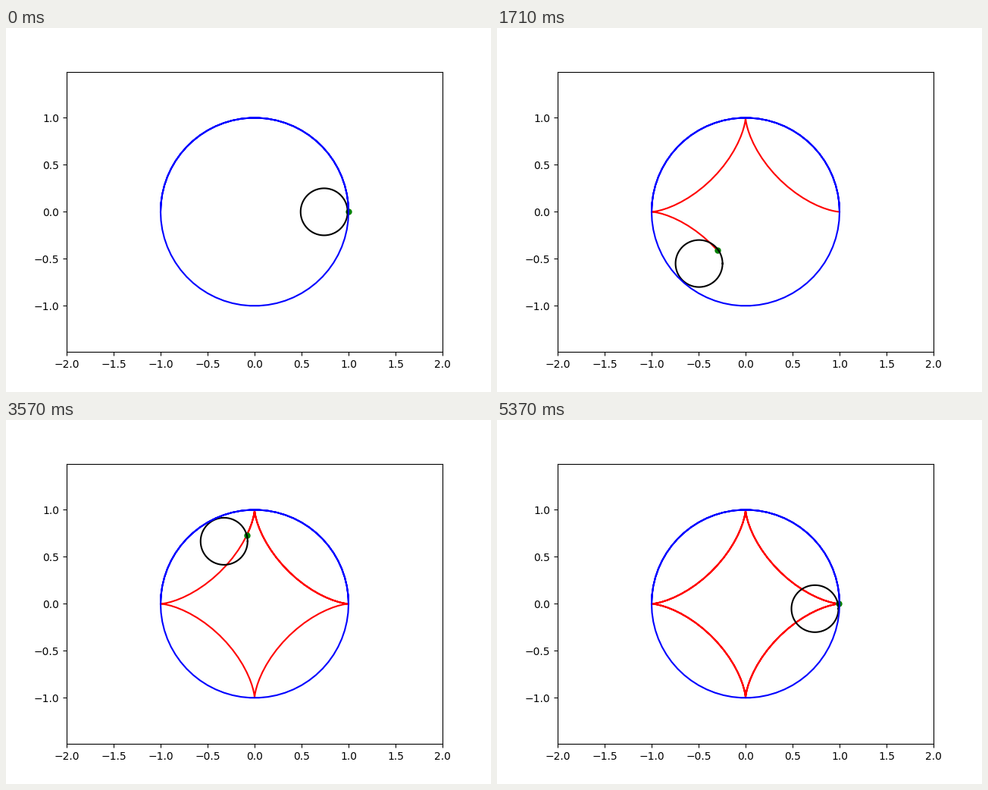
Write a matplotlib script that moves like this. It is 640 by 480 pixels and loops after 5400 ms.

```python
import numpy as np
import matplotlib.pyplot as plt
from matplotlib.animation import FuncAnimation

FRAMES = 180
STEP = np.radians(4)
R, r = 1.0, 0.25
GAP = 0.01  # keeps the rolling circle just inside the big one

fig, ax = plt.subplots(figsize=(6.4, 4.8), dpi=100)
ax.set_aspect("equal", adjustable="datalim")
ax.set_xlim(-2, 2)
ax.set_ylim(-1.5, 1.5)

# Path of a point on the rolling circle, two full turns
angle = np.arange(FRAMES) * STEP
path_x = (R - r) * np.cos(angle) + r * np.cos((R - r) / r * angle)
path_y = (R - r) * np.sin(angle) - r * np.sin((R - r) / r * angle)

turn = np.linspace(0, 2 * np.pi, 100)
ring_x, ring_y = r * np.cos(turn), r * np.sin(turn)

trace, = ax.plot([], [], "r")
dot, = ax.plot([], [], "go", markersize=5)
ring, = ax.plot([], [], "k")

# One and a half turns, so the upper half is drawn twice
sweep = np.linspace(0, 3 * np.pi, 100)
ax.plot(R * np.cos(sweep), R * np.sin(sweep), "b")

ax.set_xlim(-2, 2)
ax.set_ylim(-1.5, 1.5)


def update(i):
    a = angle[i]
    reach = R - r - GAP
    trace.set_data(path_x[:i + 1], path_y[:i + 1])
    dot.set_data([path_x[i]], [path_y[i]])
    ring.set_data(reach * np.cos(a) + ring_x, reach * np.sin(a) + ring_y)
    return trace, dot, ring


anim = FuncAnimation(fig, update, frames=FRAMES, interval=30,
                     repeat=True, repeat_delay=0, blit=False)
plt.show()
```
